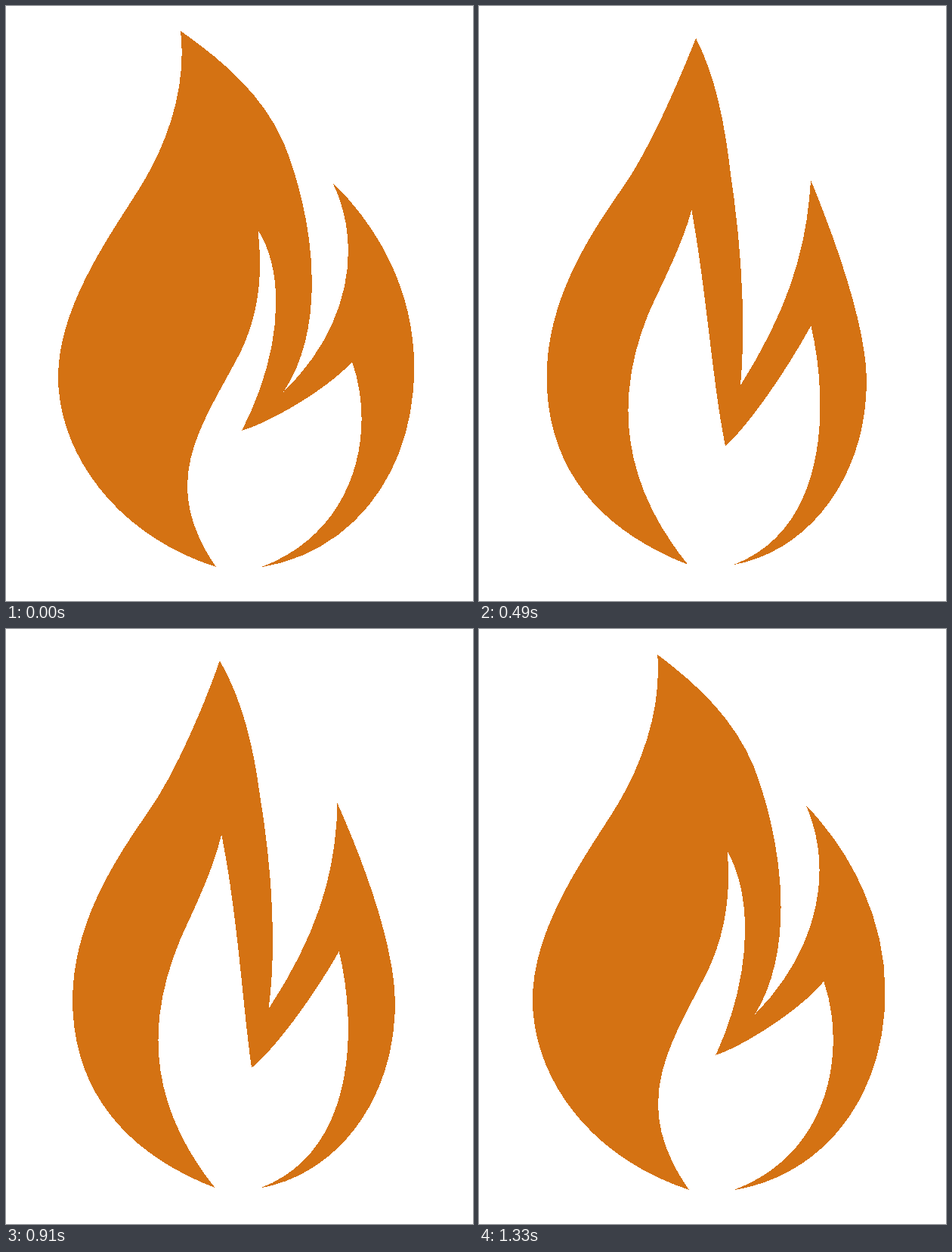
Write an HTML page that moves like this. It is 618 px wide and 786 px high and loops after 1400 ms.

```html
<!DOCTYPE html>
<html lang="en">
<head>
<meta charset="utf-8">
<title>Flame</title>
<style>
  html, body { margin: 0; width: 100%; height: 100%; overflow: hidden; background: #fff; }
  svg { display: block; width: 100%; height: 100%; }
  path { fill: #d47213; shape-rendering: crispEdges; }
</style>
</head>
<body>
<svg viewBox="0 0 618 786"><path id="flame"/></svg>
<script>
  // Two poses with the same commands; every number is blended between them.
  const wide = `M231 33
    C239 100 218 172 182 232 S69 392 69 490 S143 698 278 741
    C200 628 258 557 310 458 C335 406 340 354 333.5 296
    C372 357 363 463 312 561 C352 549 428 504 458 470
    C490 560 465 694 337 741.5 C460 722 541 614 540 478
    C541 392 504.5 303 432 233 C473 316 455 425 367 510
    C420 432 412 307 376 203 C353 132 300 81 231 33Z`;
  const slim = `M303 45
    C274 94 236 174 209 217 S95.5 359 95.5 490 S168 692 276 737
    C174 616 163 490 200 391 C215 356 248 307 266.5 262
    C281 385 294 512 330 587 C352 562 394 487 434 409
    C452 498 470 687 336 737.5 C438 718 505 614 505 503
    C506 440 467 322 441 229 C423 313 402 385 340 498.5
    C334 420 330 327 321 230 C317.5 162 317 97 303 45Z`;

  const STEP = 70, STEPS = 20, RISE = 9;
  const number = /[\d.]+/g;
  const slimValues = slim.match(number).map(Number);
  const flame = document.getElementById('flame');

  // Straight climb towards the slim pose, then a slightly slower return.
  const blendAt = k => (k <= RISE ? k : 9.4 - 0.972 * (k - 10)) / RISE;

  function morph(f) {
    let i = 0;
    return wide.replace(number, n => (+n + (slimValues[i++] - n) * f).toFixed(2));
  }

  const start = performance.now();
  let shown = -1;

  function draw(now) {
    const k = Math.floor(Math.max(0, now - start) / STEP) % STEPS;
    if (k !== shown) flame.setAttribute('d', morph(blendAt(shown = k)));
    requestAnimationFrame(draw);
  }
  draw(start);
</script>
</body>
</html>
```
